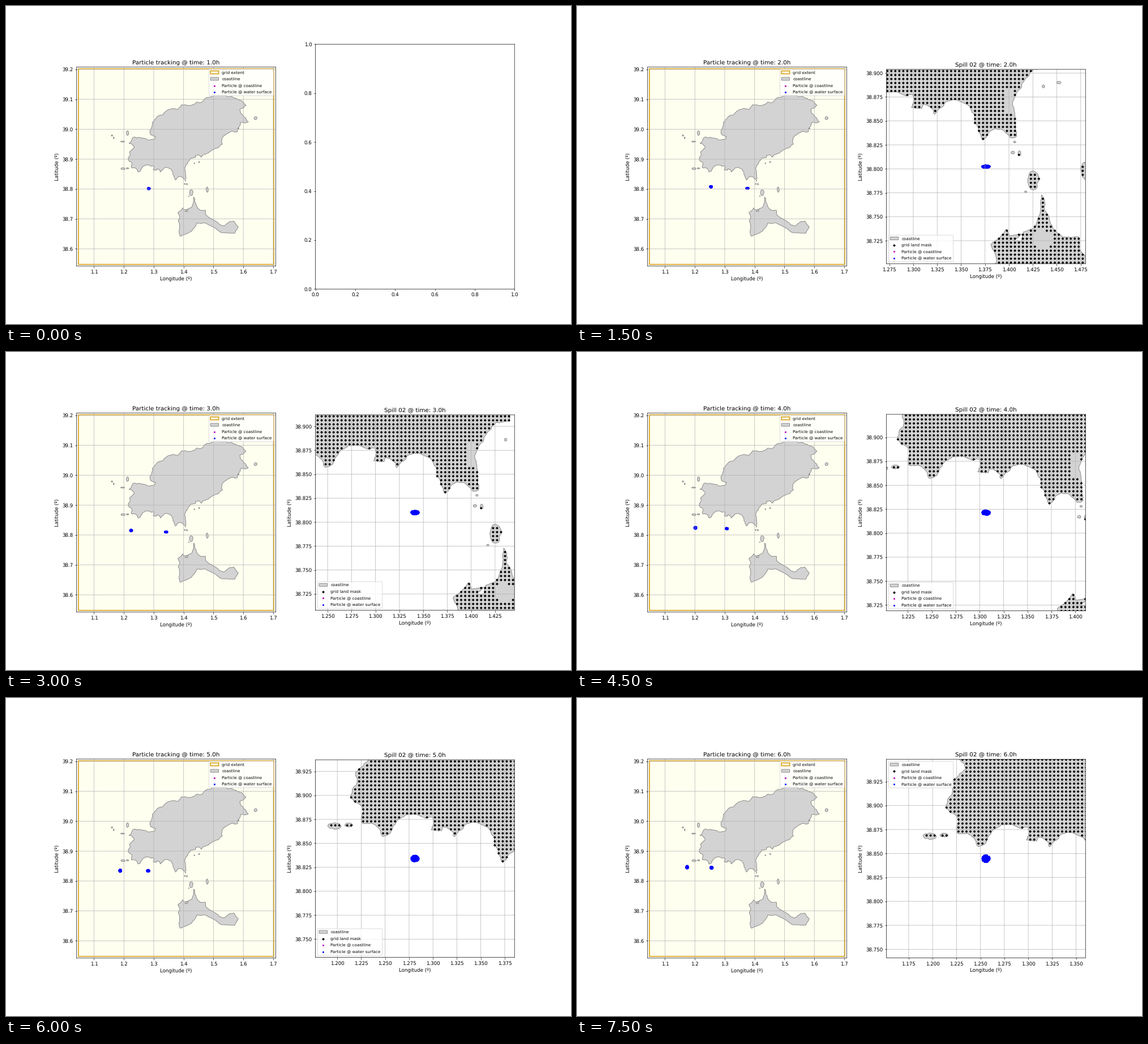
These frames come from a looping animation (998 px wide and 561 px high, 8000 ms). A matplotlib script:

```python
import numpy as np
import matplotlib.pyplot as plt
from matplotlib.animation import FuncAnimation
from matplotlib.patches import Polygon, Rectangle
from matplotlib.path import Path

DPI = 62.375
MARGIN = 0.1          # degrees of sea around the spill in the close-up
CELL = 1 / 240        # grid spacing in degrees
HOURS = 6

plt.rcParams.update({"path.snap": False, "text.hinting": "none",
                     "legend.fontsize": "small", "legend.labelspacing": .65})

# Key points of the coast: thousandths of a degree east of 1 and north of 38.
MAIN_ISLAND = [
    (217, 953), (235, 938), (219, 924), (214, 900), (226, 888), (225, 872),
    (238, 870), (248, 857), (256, 862), (272, 880), (300, 877), (298, 864),
    (309, 863), (310, 867), (318, 865), (322, 857), (327, 863), (345, 872),
    (364, 857), (368, 840), (373, 830), (385, 842), (396, 838), (402, 832),
    (408, 834), (406, 850), (405, 872), (421, 897), (426, 904), (440, 906),
    (440, 912), (452, 914), (459, 906), (480, 919), (507, 936), (530, 950),
    (534, 978), (556, 991), (579, 991), (590, 1022), (617, 1025), (605, 1040),
    (588, 1065), (609, 1080), (594, 1096), (554, 1109), (522, 1114),
    (482, 1107), (442, 1090), (423, 1079), (393, 1082), (378, 1066),
    (344, 1062), (313, 1044), (295, 1023), (287, 996), (289, 982), (306, 976),
    (304, 969), (272, 969), (234, 974),
]
SOUTH_ISLAND = [
    (434, 773), (437, 768), (437, 757), (446, 738), (456, 729), (473, 729),
    (473, 718), (488, 703), (522, 680), (534, 676), (554, 691), (568, 693),
    (583, 673), (571, 652), (526, 654), (499, 673), (470, 687), (444, 686),
    (427, 659), (389, 642), (385, 661), (387, 678), (382, 695), (387, 703),
    (381, 721), (397, 737), (401, 730), (413, 732), (405, 725), (413, 724),
    (415, 734), (426, 738), (431, 750), (433, 765),
]
# Islets and rocks: lon, lat, half width, half height.
ISLETS = [
    (425.5, 788, 6, 10), (197, 868, 7, 3.5), (212, 869, 4.3, 2),
    (479, 798, 3.5, 9), (212, 987, 4, 8), (641, 1037, 5, 5),
    (196, 958.5, 7, 1.5), (411, 816.3, 1.5, 2.5),
]
ROCKS = [
    (417.5, 776, 1.2, 1), (406, 828, 1.3, 1), (404, 817, 1.9, 1.5),
    (436, 886, 1.4, 1.5), (452, 890, 2.4, 1.3), (160, 979, 2.5, 2.2),
    (166, 971, 1.4, 3), (584, 1003, 1.2, 2),
]
# Low ground that the grid does not count as land.
LAGOONS = [(1.4345, 38.7267, .011, .0095), (1.400, 38.870, .006, .014)]


def roughen(points, seed, amp, depth=3):
    """Break a closed outline up by displacing segment midpoints."""
    rng = np.random.default_rng(seed)
    p = np.array(points, float)
    for _ in range(depth):
        step = np.roll(p, -1, axis=0) - p
        normal = np.column_stack([-step[:, 1], step[:, 0]])
        shift = rng.uniform(-amp, amp, (len(p), 1))
        p = np.stack([p, p + step / 2 + normal * shift], axis=1).reshape(-1, 2)
    return p / 1000 + (1, 38)


def oval(lon, lat, rx, ry):
    t = np.arange(8) * np.pi / 4
    return np.column_stack([lon + rx * np.cos(t), lat + ry * np.sin(t)])


def land_mask(outlines):
    lon = (np.arange(275, 380) + .5) * CELL
    lat = (np.arange(9270, 9360) + .5) * CELL
    grid = np.column_stack([a.ravel() for a in np.meshgrid(lon + 0, lat)])
    land = np.any([Path(o).contains_points(grid) for o in outlines], axis=0)
    for x, y, rx, ry in LAGOONS:
        land &= np.hypot((grid[:, 0] - x) / rx, (grid[:, 1] - y) / ry) > 1
    return grid[land]


def spill_1(h):
    """Centre lon, lat and width, height of the cloud at hour h."""
    lon = np.interp(h, [0, 2, 3, 5], [1.2833, 1.2242, 1.2015, 1.1740])
    return lon, 38.8013 + .0055 * h + .0007 * h**2, .0068, .0040 + .0010 * h


def spill_2(h):
    lon = np.interp(h, [1, 3, 5], [1.3760, 1.3066, 1.2558])
    lat = np.polyval([-.00049, .0005, .01254, 38.8215], h - 3)
    return lon, lat, .0080, .0018 + .0011 * h


def cloud(lon, lat, width, height, seed):
    rng = np.random.default_rng(seed)
    a = rng.uniform(0, 2 * np.pi, 180)
    r = rng.uniform(0, 1, 180) ** .55
    p = np.column_stack([r * np.cos(a), r * np.sin(a)])
    p = (p - p.min(0)) / np.ptp(p, axis=0) - .5
    return p * (width, height) + (lon, lat)


def add_coast(ax):
    for i, outline in enumerate(coast):
        ax.add_patch(Polygon(outline, fc="lightgray", ec="gray", lw=1,
                             label="coastline" if i == 0 else None))


def add_dots(ax, points, label, size=6, **style):
    # One size per point keeps the markers off whole-pixel positions.
    ax.scatter(*points.T, s=np.full(len(points), size), label=label, **style)


def add_particles(ax, points):
    ax.scatter([], [], s=6, c="m", label="Particle @ coastline")
    add_dots(ax, points, "Particle @ water surface", color="b")


def dress(ax, title, lon, lat, half_width, half_height, corner):
    ax.set(title=title, xlabel="Longitude (º)", ylabel="Latitude (º)",
           xlim=(lon - half_width, lon + half_width),
           ylim=(lat - half_height, lat + half_height), aspect="equal")
    ax.grid(True)
    ax.legend(loc=corner)


def draw_overview(ax, hour):
    ax.clear()
    ax.add_patch(Rectangle((1.0479, 38.5479), .6542, .6542, fc="ivory",
                           ec="goldenrod", lw=2, label="grid extent"))
    add_coast(ax)
    dots = cloud(*spill_1(hour), seed=hour)
    if hour:
        dots = np.vstack([dots, cloud(*spill_2(hour), seed=10 + hour)])
    add_particles(ax, dots)
    dress(ax, f"Particle tracking @ time: {hour + 1:.1f}h",
          1.375, 38.875, .3333, .3328, "upper right")


def draw_closeup(ax, hour):
    ax.clear()
    ax.set_aspect("auto")
    if hour == 0:
        return
    lon, lat, width, height = spill_2(hour)
    add_coast(ax)
    add_dots(ax, mask, "grid land mask", size=9, marker="D", color="k", lw=1,
             zorder=2)
    add_particles(ax, cloud(lon, lat, width, height, seed=10 + hour))
    dress(ax, f"Spill 02 @ time: {hour + 1:.1f}h", lon, lat,
          width / 2 + MARGIN, height / 2 + MARGIN,
          "upper left" if hour == HOURS - 1 else "lower left")


def update(i):
    hour = min(i // 3, HOURS - 1)
    draw_overview(overview, hour)
    draw_closeup(closeup, hour)


land = [roughen(MAIN_ISLAND, 4, .16), roughen(SOUTH_ISLAND, 7, .08)]
land += [roughen(oval(*e), 20 + k, .2, 1) for k, e in enumerate(ISLETS)]
mask = land_mask(land)
coast = land + [roughen(oval(*e), 40 + k, .2, 1) for k, e in enumerate(ROCKS)]

fig, (overview, closeup) = plt.subplots(
    1, 2, figsize=(998 / DPI, 561.001 / DPI), dpi=DPI)
anim = FuncAnimation(fig, update, frames=16, interval=500,
                     init_func=lambda: update(0), repeat=True,
                     repeat_delay=0, blit=False)
plt.show()
```
